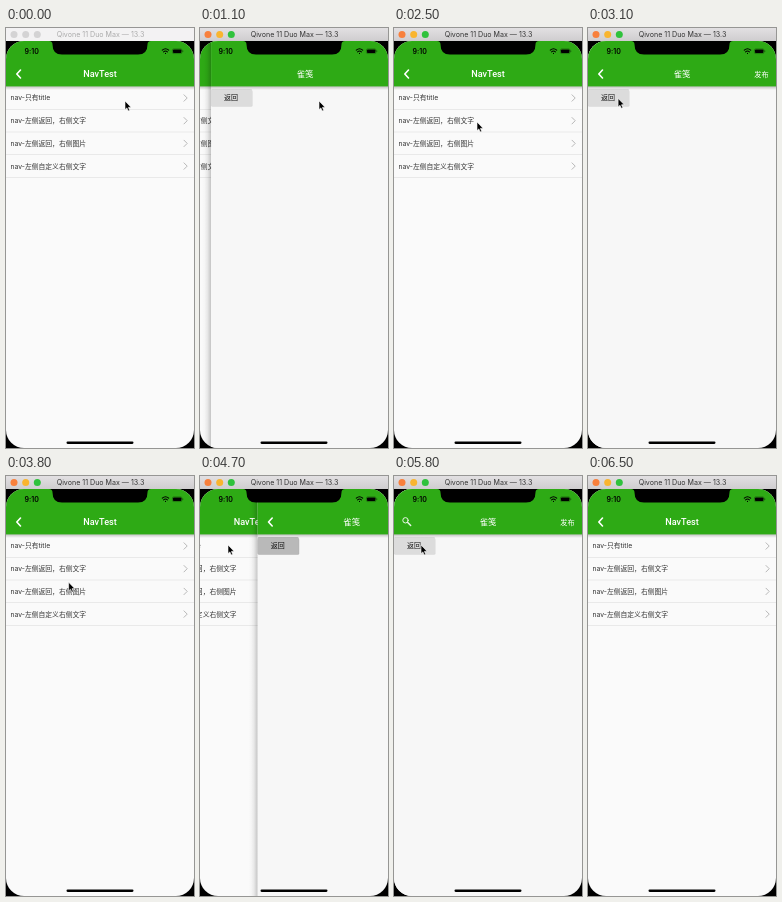
Recreate the animation shown at these times as an HTML page. Size 188 by 420 pixels, loop 6600 ms.

```html
<!DOCTYPE html>
<html lang="zh">
<head>
<meta charset="utf-8">
<style>
  html, body { margin: 0; width: 100%; height: 100%; overflow: hidden; background: #000; }
  svg { display: block; width: 188px; height: 420px; }
  text { font-family: Inter, "Noto Sans CJK SC", "Noto Sans CJK JP", "Noto Sans CJK", sans-serif; }
  .mid { text-anchor: middle; }
  .line { fill: none; stroke-linecap: round; stroke-linejoin: round; }
</style>
</head>
<body>
<svg viewBox="0 0 188 420">
  <defs>
    <clipPath id="screen"><rect y="13" width="188" height="407" rx="18"/></clipPath>
    <linearGradient id="drop" x2="0" y2="1">
      <stop stop-opacity=".24"/><stop offset="1" stop-opacity="0"/>
    </linearGradient>
    <linearGradient id="edge">
      <stop stop-opacity="0"/><stop offset=".3" stop-opacity=".016"/>
      <stop offset=".6" stop-opacity=".07"/><stop offset="1" stop-opacity=".22"/>
    </linearGradient>
    <linearGradient id="active" x2="0" y2="1">
      <stop stop-color="#e2e0e2"/><stop offset="1" stop-color="#cfcdcf"/>
    </linearGradient>
  </defs>

  <g clip-path="url(#screen)">
    <g id="list"></g>
    <g id="page"></g>
    <g id="status">
      <text x="18.5" y="26" font-size="7" font-weight="600">9:10</text>
      <g class="line" stroke="#000" stroke-width="1.1">
        <path d="M156.3 22.2Q159.5 19.4 162.7 22.2M157.6 23.8Q159.5 22.1 161.4 23.8"/>
        <path d="M159.5 25.3v.1"/>
      </g>
      <rect x="166.4" y="20.8" width="9.6" height="4.8" rx="1.3" fill="none" stroke="#000" stroke-opacity=".5" stroke-width=".5"/>
      <rect x="167" y="21.4" width="8.4" height="3.6" rx=".8"/>
      <rect x="176.5" y="22.4" width=".7" height="1.6" opacity=".5"/>
    </g>
    <path d="M43 13Q46.500 13 46.500 16.500Q46.500 26.600 56 26.600H132Q141.500 26.600 141.500 16.500Q141.500 13 145 13Z"/>
    <rect x="60.500" y="413.600" width="67" height="2.300" rx="1.150"/>
  </g>

  <rect id="bar" width="188" height="13"/>
  <g id="dots">
    <circle cx="8" cy="6.500" r="3.500"/><circle cx="19.700" cy="6.500" r="3.500"/><circle cx="31.300" cy="6.500" r="3.500"/>
  </g>
  <text id="title" class="mid" x="94.500" y="9.200" font-size="7.100">Qivone 11 Duo Max — 13.3</text>

  <path id="cursor" d="M0 0V8.600L1.900 6.900L3.200 9.900L4.700 9.300L3.400 6.400L6 6.200Z" stroke="#fff" stroke-width=".6"/>
</svg>

<script>
const $ = id => document.getElementById(id);
const LOOP = 6600, SLIDE = 400, W = 188;

const back = '<path class="line" d="M14.500 42L10.800 46L14.500 50" stroke="#fff" stroke-width="1.600"/>';
const search = x => `<g class="line" stroke="#fff" transform="translate(${x} 0)" opacity=".9">
  <circle cx="11.500" cy="44.300" r="2.700" stroke-width="1"/><path d="M13.700 46.500L16.700 49.500" stroke-width="1.400"/></g>`;
const publish = '<text class="mid" x="173.500" y="48.700" font-size="7.200" fill="#fff">发布</text>';

const frame = (title, items, body, bg) => `<rect y="13" width="188" height="407" fill="${bg}"/>
  ${body}<rect y="58" width="188" height="4" fill="url(#drop)"/>
  <rect y="13" width="188" height="45.400" fill="#2eaa15"/>
  ${title}${items}`;

const rows = ['nav-只有title', 'nav-左侧返回，右侧文字', 'nav-左侧返回，右侧图片', 'nav-左侧自定义右侧文字'];
const rowSvg = rows.map((label, i) => {
  const y = 70 + i * 22.7;
  return `<text x="4.500" y="${y + 2.4}" font-size="6.800" fill="#333">${label}</text>
    <path class="line" d="M178 ${y - 3.2}l3.200 3.200l-3.200 3.200" stroke="#b8b8b8" stroke-width="1"/>
    <rect y="${y + 11}" width="188" height=".6" fill="#dedede"/>`;
}).join('');
$('list').innerHTML = frame(
  '<text class="mid" x="94" y="49.200" font-size="9.100" font-weight="500" fill="#fff" style="font-family:Roboto,sans-serif">NavTest</text>',
  back, rowSvg, '#fafafa');

const pageTitle = '<text class="mid" x="94" y="49.100" font-size="8.400" font-weight="500" fill="#fff">雀笺</text>';
const button = `<rect id="glow" x="0" y="62.300" width="41.500" height="16.500" rx="1.500" opacity=".16"/>
  <rect id="button" y="61" width="41" height="17" rx="1.200"/>
  <text class="mid" x="20" y="72" font-size="7" font-weight="500" fill="#111">返回</text>`;
const edge = '<rect x="-9.400" y="13" width="9.400" height="407" fill="url(#edge)"/>';
const pages = ['', back + publish, back + search(160), search(0) + publish]
  .map(items => edge + frame(pageTitle, items, button, '#f7f7f7'));

// push and pop start of each visit
const visits = [[880, 2000], [2680, 3300], [3960, 4653], [5140, 5980]];

// cursor stops: time, x, y
const stops = [
  [0, 119, 73], [1500, 119, 73], [1950, 27, 69], [2150, 27, 69],
  [2500, 83, 94], [2800, 83, 94], [3150, 27, 69], [3380, 27, 69],
  [3950, 70, 114], [4100, 70, 114], [4450, 28, 69], [4720, 28, 69],
  [5050, 65, 136], [5250, 65, 136], [5700, 28, 71], [5800, 27, 69], [LOOP, 27, 69]
];

const bezier = (s, a, b) => 3 * a * s * (1 - s) ** 2 + 3 * b * s * s * (1 - s) + s ** 3;
function glide(x) {
  if (x <= 0) return 0;
  if (x >= 1) return 1;
  let lo = 0, hi = 1;
  for (let i = 0; i < 20; i++) {
    const m = (lo + hi) / 2;
    bezier(m, .35, .33) < x ? lo = m : hi = m;
  }
  return bezier(lo, .91, .97);
}

function pointer(t) {
  const i = stops.findIndex(s => s[0] > t);
  const [t0, x0, y0] = stops[i - 1], [t1, x1, y1] = stops[i];
  const u = (t - t0) / (t1 - t0), k = u * u * (3 - 2 * u);
  return [x0 + (x1 - x0) * k, y0 + (y1 - y0) * k];
}

let shown = -1;
function draw(now) {
  const t = Math.floor(now % LOOP / 100) * 100;

  const active = t >= 500;
  $('bar').setAttribute('fill', active ? 'url(#active)' : '#f3f2f3');
  $('title').setAttribute('fill', active ? '#333' : '#aaa');
  ['#f8803c', '#f9b52f', '#2fc23c'].forEach((c, i) =>
    $('dots').children[i].setAttribute('fill', active ? c : '#d4d3d4'));

  const n = visits.findIndex(([push, pop]) => t >= push && t < pop + SLIDE);
  let open = 0;
  if (n >= 0) {
    const [push, pop] = visits[n];
    if (n !== shown) $('page').innerHTML = pages[shown = n];
    open = glide((t - push) / SLIDE) - glide((t - pop) / SLIDE);
    const pressed = t >= pop - 60;
    $('button').setAttribute('fill', pressed ? '#b9b9b9' : '#dcdcdc');
    $('glow').setAttribute('opacity', pressed ? .28 : .12);
  }
  $('page').style.display = n < 0 ? 'none' : '';
  $('page').setAttribute('transform', `translate(${W * (1 - open)} 0)`);
  $('list').setAttribute('transform', `translate(${-W / 3 * open} 0)`);

  $('cursor').setAttribute('transform', `translate(${pointer(t)})`);
  $('cursor').style.display = t < 6450 ? '' : 'none';
  requestAnimationFrame(loop);
}
const start = performance.now();
const loop = () => draw(performance.now() - start);
loop();
</script>
</body>
</html>
```
